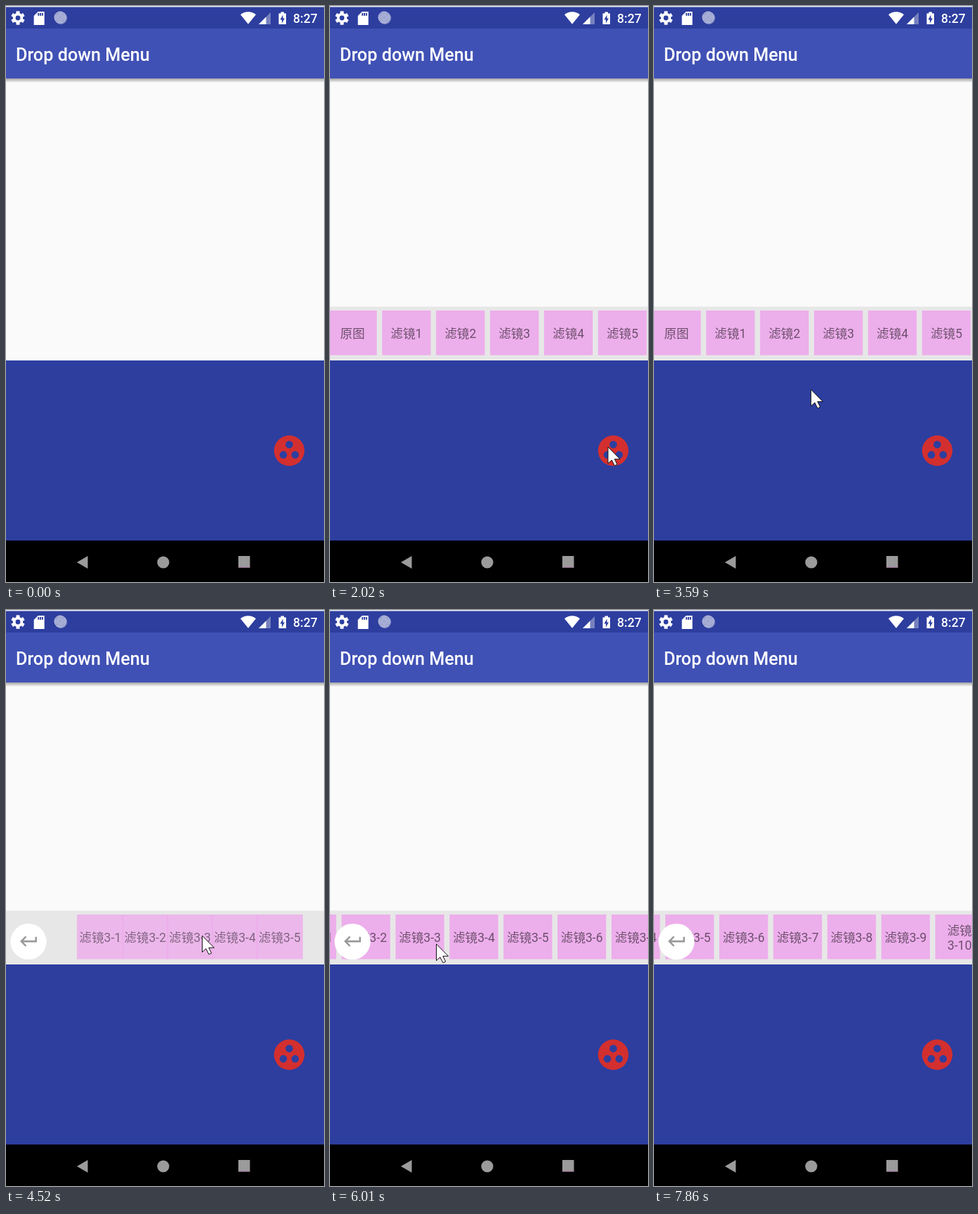
Animation of 453x819 px, one loop 8000 ms. Source, as an HTML page with a canvas:

```html
<!DOCTYPE html>
<html lang="en">
<head>
<meta charset="utf-8">
<title>Drop down Menu</title>
<style>
  html, body { margin: 0; width: 100%; height: 100%; overflow: hidden; }
  canvas { display: block; }
</style>
</head>
<body>
<canvas id="stage" width="453" height="819"></canvas>
<script>
const ctx = document.getElementById('stage').getContext('2d');
const LOOP = 8000, WIDTH = 453;
const STEP = 76.9, TILE = 69.3, PANEL_HEIGHT = 76.5, BLOCK_TOP = 504, BLOCK_END = 760;
const NAVY = '#2d3e9f', GREY = '#9b9b9b';
const SUBMENU_START = 4302, SUBMENU_SHOWN = 4345;
const DRAG_SLOP = 12;

const enterIcon = new Path2D('M19 7v4H5.8l3.6-3.6L8 6l-6 6 6 6 1.4-1.4L5.8 13H21V7z');
const cursorIcon = new Path2D('M0 0V23.5L5.4 18.6 9.4 26.6 13.2 24.9 9.3 17.2H17z');

// Each move sets off from where the one before it stopped.
const pointerStart = { x: 382, y: 744 };
const moves = [
  { at: 530, lasts: 460, x: 406.5, y: 633 },
  { at: 1400, lasts: 600, x: 396, y: 627 },
  { at: 3390, lasts: 200, x: 223.5, y: 545.5 },
  { at: 3590, lasts: 460, x: 279.5, y: 463 },
  { at: 4600, lasts: 600, x: 170, y: 481, drag: true },
  { at: 5300, lasts: 80, x: 200, y: 477 },
  { at: 5480, lasts: 520, x: 151.5, y: 475, drag: true },
  { at: 6020, lasts: 400, x: 380, y: 469 },
  { at: 6560, lasts: 1300, x: 137, y: 478, drag: true }
];

const clamp = x => Math.min(1, Math.max(0, x));
const ease = x => (1 - Math.cos(Math.PI * clamp(x))) / 2;

// Pointer position, and the list offset its drags have caused.
function pointerAt(t) {
  let { x, y } = pointerStart, scroll = 0;
  for (const move of moves) {
    const f = clamp((t - move.at) / move.lasts);
    const dx = (move.x - x) * f;
    if (move.drag) scroll += Math.max(0, -dx - DRAG_SLOP);
    x += dx;
    y += (move.y - y) * f;
    if (f < 1) break;
  }
  return { x, y, scroll };
}

function rect(x, y, w, h, color) {
  ctx.fillStyle = color;
  ctx.fillRect(x, y, w, h);
}

function circle(x, y, r, color) {
  ctx.fillStyle = color;
  ctx.beginPath();
  ctx.arc(x, y, r, 0, 7);
  ctx.fill();
}

function polygon(color, ...points) {
  ctx.fillStyle = color;
  ctx.beginPath();
  points.forEach(([x, y]) => ctx.lineTo(x, y));
  ctx.fill();
}

function icon(path, x, y, scale, color, outline) {
  ctx.save();
  ctx.translate(x, y);
  ctx.scale(scale, scale);
  ctx.fillStyle = color;
  ctx.fill(path);
  if (outline) {
    ctx.strokeStyle = outline;
    ctx.lineWidth = 1;
    ctx.stroke(path);
  }
  ctx.restore();
}

function text(string, x, y, size, weight, color, align = 'left') {
  ctx.font = `${weight} ${size}px Roboto, "Noto Sans CJK SC", "Noto Sans CJK", sans-serif`;
  ctx.textAlign = align;
  ctx.fillStyle = color;
  ctx.fillText(string, x, y);
}

function drawGear(x, y) {
  ctx.save();
  ctx.translate(x, y);
  for (let i = 0; i < 6; i++) {
    rect(-2.5, -9.7, 5, 6, '#fff');
    ctx.rotate(Math.PI / 3);
  }
  ctx.restore();
  circle(x, y, 7.2, '#fff');
  circle(x, y, 3.4, NAVY);
}

function drawCard(x, y) {
  polygon('#fff', [x, y + 6], [x + 6, y], [x + 15, y], [x + 15, y + 19], [x, y + 19]);
  for (let i = 0; i < 3; i++) rect(x + 5.6 + i * 2.8, y + 2, 1.9, 3.8, NAVY);
}

function drawSpinner(x, y) {
  circle(x, y, 9, '#8c95c8');
  ctx.strokeStyle = '#c3c8e4';
  ctx.lineWidth = 1;
  for (let r = 2; r < 9; r += 2) {
    ctx.beginPath();
    ctx.arc(x - 1, y - 1, r, 0, 7);
    ctx.stroke();
  }
}

function drawWifi(x, y) {
  ctx.fillStyle = '#fff';
  ctx.beginPath();
  ctx.moveTo(x, y);
  ctx.arc(x, y, 17.5, -Math.PI / 2 - .68, -Math.PI / 2 + .68);
  ctx.fill();
}

function drawBattery(x, y) {
  rect(x, y + 2, 10.5, 15.5, '#fff');
  rect(x + 3, y, 4.5, 3, '#fff');
  polygon(NAVY, [x + 6, y + 4], [x + 2, y + 11], [x + 4.5, y + 11],
    [x + 4.5, y + 16], [x + 8.5, y + 9], [x + 6, y + 9]);
}

function drawHeader() {
  rect(0, 0, WIDTH, 32, NAVY);
  rect(0, 0, WIDTH, 1.5, '#eceef6');
  drawGear(17, 17);
  drawCard(39.7, 8);
  drawSpinner(78, 17);
  drawWifi(345, 25.8);
  polygon('#7781bf', [360, 26], [377, 26], [377, 9]);
  polygon('#fff', [360, 26], [370.5, 26], [370.5, 15.5]);
  drawBattery(388.5, 8.5);
  text('8:27', 409, 23.5, 17.6, 500, '#fff');

  rect(0, 32, WIDTH, 71, '#4051b5');
  const shadow = ctx.createLinearGradient(0, 103, 0, 109);
  shadow.addColorStop(0, 'rgba(0,0,0,.35)');
  shadow.addColorStop(1, 'rgba(0,0,0,0)');
  rect(0, 103, WIDTH, 6, shadow);
  text('Drop down Menu', 14, 78, 25.2, 500, '#fff');
}

function drawTile(lines, center, top, width = TILE) {
  rect(center - width / 2, top + 5.5, width, 63.5, '#edaeec');
  const first = top + 44.5 - (lines.length - 1) * 10.5;
  lines.forEach((line, i) => text(line, center, first + i * 21, 17.6, 400, 'rgba(0,0,0,.54)', 'center'));
}

function drawMainMenu(top) {
  for (let i = 0; i < 6; i++) drawTile([i ? '滤镜' + i : '原图'], 32 + i * STEP, top);
}

// The first five entries fan out from the chosen tile; the rest wait off-screen.
function drawSubmenu(t, top, scroll) {
  const spread = ease((t - SUBMENU_START) / 300);
  ctx.globalAlpha = spread;
  for (let i = 1; i <= (spread < 1 ? 5 : 10); i++) {
    const label = i < 10 ? ['滤镜3-' + i] : ['滤镜', '3-' + i];
    drawTile(label, 262 + (i - 3) * STEP * spread - scroll, top, TILE * (.75 + .25 * spread));
  }
  ctx.globalAlpha = 1;
  circle(32, 471.5, 25.6, '#fff');
  icon(enterIcon, 17.5, 456, 1.26, '#999');
}

function drawPanel(t, scroll) {
  const open = ease((t - 1248) / 400) - ease((t - 2378) / 400) + ease((t - 3195) / 400);
  if (open < .005) return;
  const top = BLOCK_TOP - PANEL_HEIGHT * open;
  rect(0, top, WIDTH, PANEL_HEIGHT, '#e7e7e7');
  if (t < SUBMENU_SHOWN) drawMainMenu(top);
  else drawSubmenu(t, top, scroll);
}

function drawBlock() {
  rect(0, BLOCK_TOP, WIDTH, BLOCK_END - BLOCK_TOP, NAVY);
  const x = 403.5, y = 632.3;
  circle(x, y, 21.7, '#d32f2f');
  for (let i = 0; i < 3; i++) {
    const angle = i * Math.PI * 2 / 3 - Math.PI / 2;
    circle(x + 9.7 * Math.cos(angle), y + 1 + 9.7 * Math.sin(angle), 5.3, NAVY);
  }
}

function drawNavigation() {
  rect(0, BLOCK_END, WIDTH, 59, '#000');
  polygon(GREY, [101, 791], [116.5, 782], [116.5, 800]);
  circle(224, 791, 8.6, GREY);
  rect(331, 782, 16.5, 16.5, GREY);
  rect(331, 797.5, 16.5, 1, '#b07fae');
}

function draw() {
  const t = performance.now() % LOOP;
  const pointer = pointerAt(t);
  rect(0, 0, WIDTH, 819, '#fafafa');
  drawHeader();
  drawPanel(t, pointer.scroll);
  drawBlock();
  drawNavigation();
  if (t >= 530 && t < 7855) icon(cursorIcon, pointer.x, pointer.y, 1, '#fff', '#111');
  requestAnimationFrame(draw);
}
draw();
</script>
</body>
</html>
```
